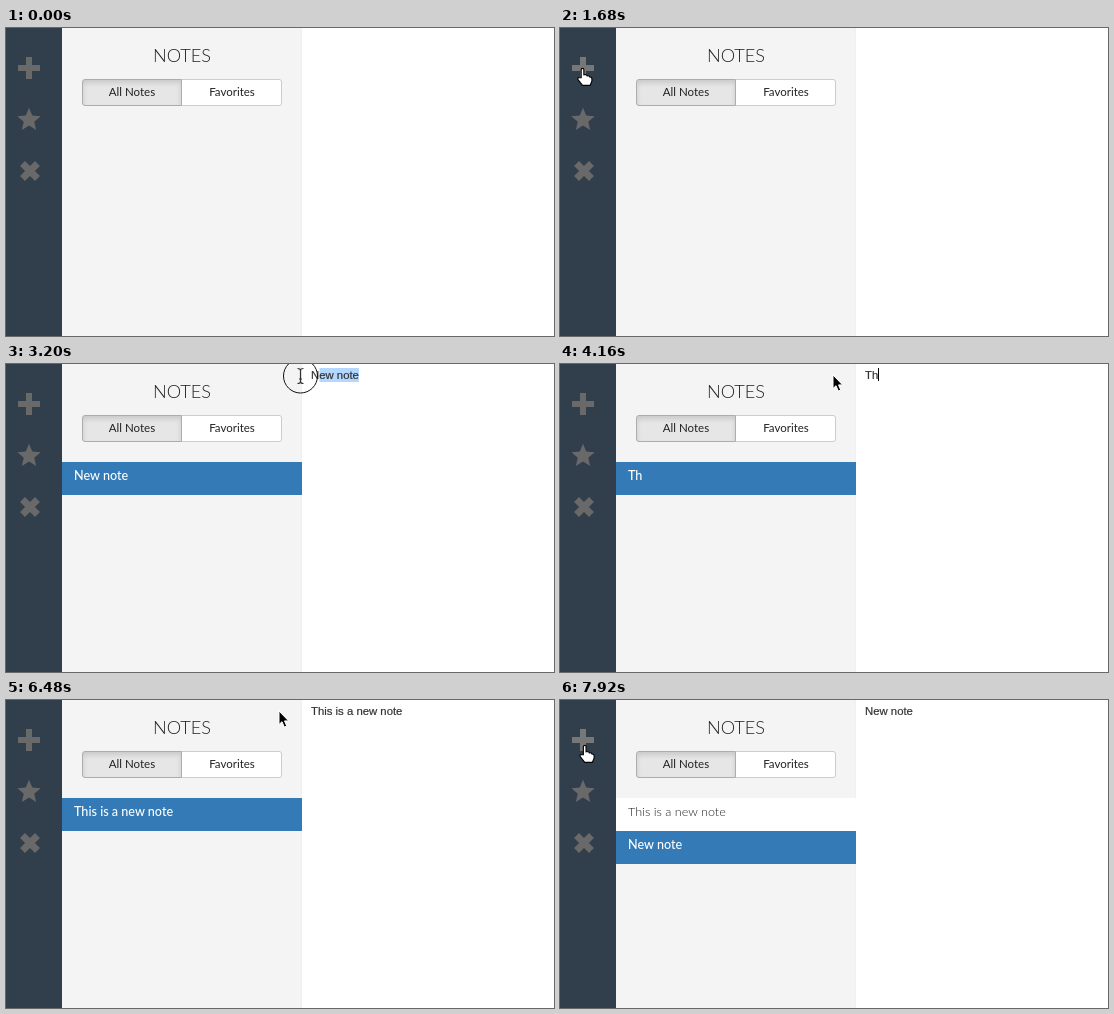
These frames come from a looping animation (548x308 px, 8 s). An HTML page:

```html
<!DOCTYPE html>
<html lang="en">
<head>
<meta charset="utf-8">
<title>Notes</title>
<style>
html, body { margin: 0; width: 100%; height: 100%; overflow: hidden; }
body {
  position: relative;
  background: linear-gradient(90deg, #303f4b 56px, #f4f4f4 0 295px, #f0f0f0 0 296px, #fff 0);
}
svg { position: absolute; left: 0; top: 0; z-index: 2; }
.btn {
  position: absolute; top: 51px; height: 27px; box-sizing: border-box;
  border: 1px solid #ccc; background: #fff;
}
.all {
  left: 76px; width: 100px; z-index: 1; border-color: #adadad; border-radius: 3px 0 0 3px;
  background: #e6e6e6; box-shadow: inset 0 3px 5px rgba(0, 0, 0, .125);
}
.fav { left: 175px; width: 101px; border-radius: 0 3px 3px 0; }
text { font: 300 12.6px Lato, "Open Sans", sans-serif; fill: #222; white-space: pre; }
.mid { text-anchor: middle; font-size: 11.5px; font-weight: 400; }
.title { font-size: 18.2px; font-weight: 300; }
.row rect { fill: #fff; }
.row.active rect { fill: #337ab7; }
.row.active text { fill: #fff; font-weight: 500; }
#body { font: 11.35px "Liberation Sans", Arial, sans-serif; fill: #333; stroke: #333; stroke-width: .2px; }
#arrow { fill: #000; stroke: #fff; }
#hand { fill: #fff; stroke: #000; }
</style>
</head>
<body>
<div class="btn all"></div>
<div class="btn fav"></div>
<svg width="548" height="308" viewBox="0 0 548 308">
  <g fill="#696969">
    <path id="plus" d="M20 29h6v8h8v6h-8v8h-6v-8h-8v-6h8z"/>
    <path id="star"/>
    <path transform="translate(24 143) rotate(45)" d="M-3.5-10.6h7v7.1h7.1v7h-7.1v7.1h-7v-7.1h-7.1v-7h7.1z"/>
  </g>
  <text class="mid title" x="176" y="34">NOTES</text>
  <text class="mid" x="126" y="68">All Notes</text>
  <text class="mid" x="226" y="68">Favorites</text>
  <g class="row" transform="translate(56 98)"><rect width="240" height="33"/><text x="12" y="18"></text></g>
  <g class="row" transform="translate(56 131)"><rect width="240" height="33"/><text x="12" y="18"></text></g>
  <rect id="mark" y="4" height="14" fill="#b3d7ff"/>
  <text id="body" x="305" y="15"></text>
  <rect id="caret" y="4" width="1" height="13"/>
  <g id="mouse">
    <circle id="ring" r="17" fill="none" stroke="#111"/>
    <path id="arrow" d="M-4-7V6.5L-1 3.7 1.3 9 3.7 8 1.5 2.9H5.6z"/>
    <path id="hand" transform="translate(.5 -.5) scale(1.12)" d="M-2.8 2V-5.2a1.2 1.2 0 0 1 2.4 0V-.6q2.6-.7 2.9 1 2-.5 2.3.9 2 0 2 1.7V5L5.2 8.8H-1.6L-5.6 3.6q-.6-2 1-1.7z"/>
    <path id="beam" d="M-3-7.5q3 0 3 2 0-2 3-2M0-5.5V5.5M-3 7.5q3 0 3-2 0 2 3 2M-1.5 3h3" fill="none" stroke="#333" stroke-width="1.2"/>
  </g>
</svg>
<script>
const LOOP = 8000, STEP = 80, LEFT = 305, BLINK = 480;
const TYPE = 4080, TYPE_END = 6160, FRESH = "New note";
const $ = id => document.getElementById(id);
const rows = [...document.querySelectorAll(".row")];

// each move: start, end, target of the pointer's centre
const moves = [
  { from: 80, to: 560, x: 212, y: 135 },
  { from: 640, to: 1040, x: 17, y: 31 },
  { from: 1280, to: 1760, x: 24, y: 48 },
  { from: 2160, to: 2880, x: 362, y: 12 },
  { from: 2960, to: 3200, x: 294.5, y: 12 },
  { from: 3200, to: 3360, x: 277, y: 18 },
  { from: 6560, to: 7440, x: 26, y: 53 }
];
// bursts of typing; letters spread evenly until the next burst
const bursts = [
  { at: TYPE, text: "This " }, { at: 4640, text: "is " }, { at: 5120, text: "a " },
  { at: 5360, text: "new n" }, { at: 5920, text: "ote" }
];

$("star").setAttribute("d", "M" + Array.from({ length: 10 }, (_, i) => {
  const r = i % 2 ? 5.5 : 12.3, a = i * Math.PI / 5;
  return [23 + r * Math.sin(a), 92 - r * Math.cos(a)];
}).join("L") + "z");

const clamp = (v, a, b) => Math.max(a, Math.min(b, v));
const within = (t, a, b) => t >= a && t < b;
const show = (el, on) => el.style.display = on ? "" : "none";
const easeOut = (u, power) => 1 - (1 - u) ** power;

// the height settles sooner than the sideways motion
function pointer(t) {
  let x = 297, y = 279;
  for (const m of moves) {
    const u = clamp((t - m.from) / (m.to - m.from), 0, 1);
    x += (m.x - x) * easeOut(u, 2);
    y += (m.y - y) * easeOut(u, 4);
  }
  return [x, y];
}

function note(t) {
  if (t < TYPE) return t < 2080 ? "" : FRESH;
  return bursts.map(({ at, text }, i) => {
    const gap = ((bursts[i + 1]?.at ?? TYPE_END) - at) / text.length;
    return t < at ? "" : text.slice(0, 1 + Math.floor((t + STEP - 1 - at) / gap));
  }).join("");
}

function setRow(row, label, active) {
  show(row, label);
  row.classList.toggle("active", active);
  row.lastChild.textContent = label;
}

function draw(t) {
  const second = t >= 7760, label = note(t), body = $("body");
  setRow(rows[0], label, !second);
  setRow(rows[1], second ? FRESH : "", true);
  body.textContent = second ? FRESH : label;

  const end = LEFT + (label ? body.getComputedTextLength() : 0);
  const idle = t - 6480;
  $("caret").setAttribute("x", Math.round(end));
  show($("caret"), within(t, TYPE, 7680) && (idle < 0 || Math.floor(idle / BLINK) % 2));

  const [x, y] = pointer(t);
  const drag = within(t, 3040, 3520);
  const from = clamp(x + 19, LEFT, end);
  show($("mark"), within(t, 3040, TYPE));
  $("mark").setAttribute("x", from);
  $("mark").setAttribute("width", end - from);

  const over = within(x, 15, 39) && within(y, 36, 60);
  const beam = drag || x > 300;
  show($("mouse"), t >= STEP);
  $("mouse").setAttribute("transform", `translate(${x} ${y})`);
  show($("hand"), over);
  show($("beam"), beam);
  show($("arrow"), !over && !beam);
  show($("ring"), drag || within(t, 1840, 2080) || within(t, 7680, 7760));
  $("plus").style.fill = over ? "#777" : "";
}

const start = performance.now();
function tick() {
  const t = (performance.now() - start) % LOOP;
  draw(Math.floor(t / STEP) * STEP);
  requestAnimationFrame(tick);
}
tick();
</script>
</body>
</html>
```
